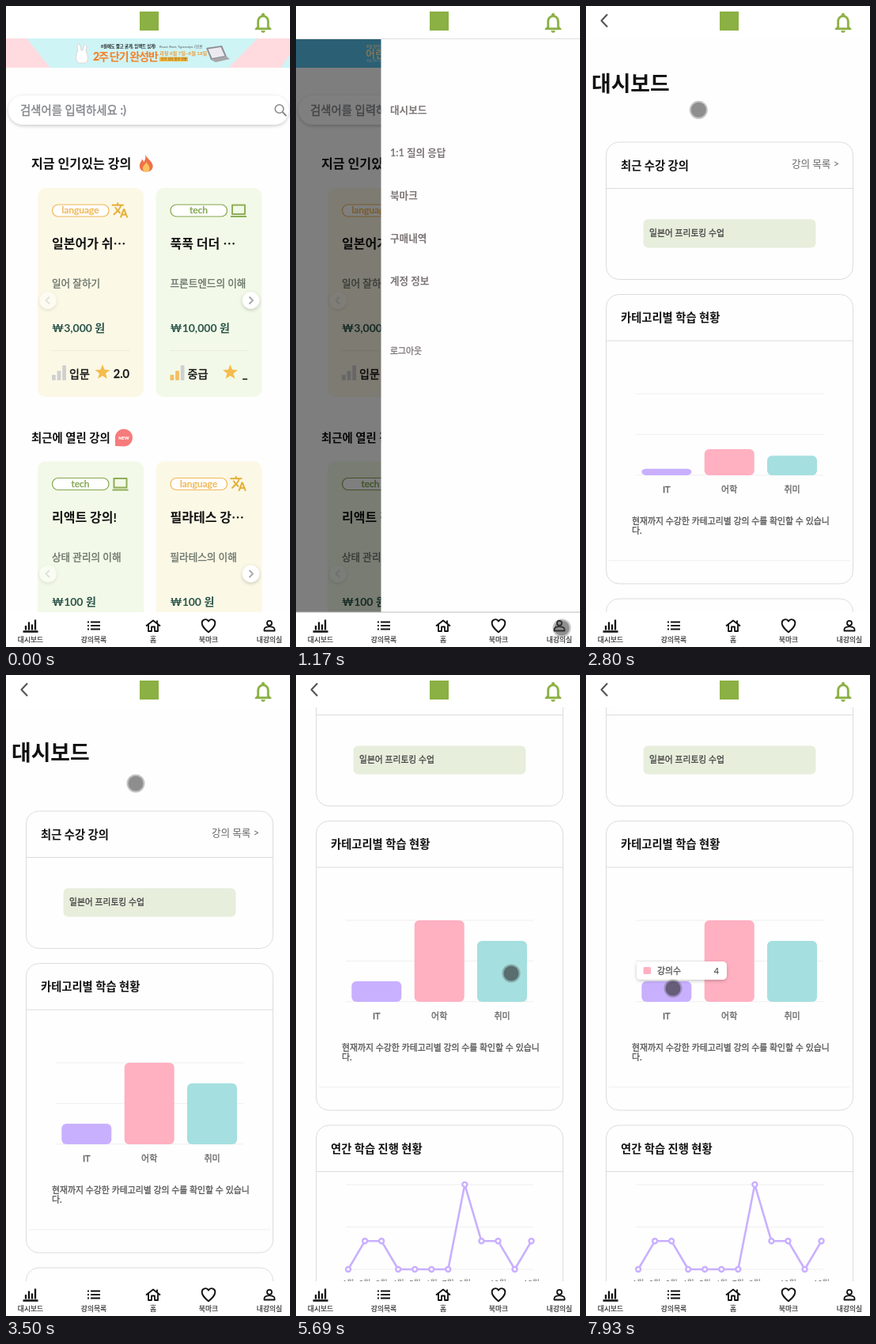
An HTML page that plays this animation: 359 by 810 pixels, repeating every 8 s.

```html
<!DOCTYPE html>
<html lang="ko">
<head>
<meta charset="utf-8">
<title>강의 대시보드</title>
<style>
  html, body { margin: 0; width: 100%; height: 100%; overflow: hidden; background: #fff; }
  svg { display: block; width: 359px; height: 810px; }
  text { font-family: Lato, "Noto Sans CJK KR", "Noto Sans CJK", sans-serif; white-space: pre; }
</style>
</head>
<body>
<svg id="stage" viewBox="0 0 359 810" xmlns="http://www.w3.org/2000/svg"></svg>
<script>
const LOOP = 8000;
const GREEN = '#8bb043', ORANGE = '#efb755', PURPLE = '#c9b0ff', PINK = '#ffb0c1', TEAL = '#a5dfdf';

// ---- drawing helpers ----
// A hairline outline stands in for the medium weight.
const text = (x, y, size, str, fill = '#111', weight = 400, anchor = 'start') =>
  `<text x="${x}" y="${y}" font-size="${size}" fill="${fill}" font-weight="${weight}" text-anchor="${anchor}"` +
  (weight === 500 ? ` stroke="${fill}" stroke-width="${size * 0.027}"` : '') + `>${str}</text>`;
const rect = (x, y, w, h, fill, r = 0, extra = '') =>
  `<rect x="${x}" y="${y}" width="${w}" height="${h}" rx="${r}" fill="${fill}" ${extra}/>`;
const line = (x1, y1, x2, y2, stroke, w = 1) =>
  `<path d="M${x1} ${y1}L${x2} ${y2}" stroke="${stroke}" stroke-width="${w}"/>`;
const stroke = (d, color, w = 2) =>
  `<path d="${d}" fill="none" stroke="${color}" stroke-width="${w}" stroke-linejoin="round"/>`;
const icon = (d, x, y, scale, fill) =>
  `<path d="${d}" transform="translate(${x} ${y}) scale(${scale})" fill="${fill}" stroke="${fill}" stroke-width=".25"/>`;
const group = (id, body, attrs = '') => `<g id="${id}" ${attrs}>${body}</g>`;

const BELL = 'M12 22c1.1 0 2-.9 2-2h-4c0 1.1.9 2 2 2zm6-6v-5c0-3.07-1.63-5.64-4.5-6.32V4c0-.83-.67-1.5-1.5-1.5s-1.5.67-1.5 1.5v.68C7.64 5.36 6 7.92 6 11v5l-2 2v1h16v-1l-2-2zm-2 1H8v-6c0-2.48 1.51-4.5 4-4.5s4 2.02 4 4.5v6z';
const TRANSLATE = 'M12.87 15.07l-2.54-2.51.03-.03c1.74-1.94 2.98-4.17 3.71-6.53H17V4h-7V2H8v2H1v1.99h11.17C11.5 7.92 10.44 9.75 9 11.35 8.07 10.32 7.3 9.19 6.69 8h-2c.73 1.63 1.73 3.17 2.98 4.56l-5.09 5.02L4 19l5-5 3.11 3.11.76-2.04zM18.5 10h-2L12 22h2l1.12-3h4.75L21 22h2l-4.5-12zm-2.62 7l1.62-4.33L19.12 17h-3.24z';
const HEART = 'M0 8.3C-5 4-8.3 1-8.3-3a4.4 4.4 0 0 1 8.3-2.4A4.4 4.4 0 0 1 8.3-3C8.3 1 5 4 0 8.3z';

// ---- home page ----
function star(cx, cy, r) {
  const pts = Array.from({ length: 10 }, (_, i) => {
    const a = -Math.PI / 2 + i * Math.PI / 5, k = i % 2 ? r * 0.42 : r;
    return `${(cx + k * Math.cos(a)).toFixed(1)},${(cy + k * Math.sin(a)).toFixed(1)}`;
  });
  return `<polygon points="${pts.join(' ')}" fill="#f4bc4b"/>`;
}

function courseCard(dx, dy, c) {
  const lang = c.tag === 'language', color = lang ? ORANGE : '#83a650';
  const levels = [7, 12, 19].map((h, i) =>
    rect(58 + i * 6.6, 473 - h, 4.8, h, i < c.level ? '#f3bf63' : '#d0d0d0', 1)).join('');
  return `<g transform="translate(${dx} ${dy})">` +
    rect(40, 230, 134, 264, lang ? '#fcf8e6' : '#f2f9e8', 10) +
    rect(58.5, 251, 71.5, 15, '#fff', 7.5, `stroke="${color}" stroke-width="1.2"`) +
    text(94, 262.3, 12, c.tag, color, 500, 'middle') +
    (lang ? icon(TRANSLATE, 133, 247, 0.92, '#e3ad35')
          : stroke('M136.5 251.5h16v11.5h-16zM134.500 266h20', '#8fae57')) +
    text(58, 306, 16, c.title, '#111', 700) +
    text(58, 355, 12.6, c.sub, '#687268', 500) +
    text(58, 412, 14, `₩${c.price} 원`, '#2d564b', 700) +
    line(58, 435.5, 156, 435.5, '#ecebdc') + levels +
    text(80, 470, 14, c.levelName, '#111', 500) + star(122 + (c.score === '_' ? 12 : 0), 463, 10) +
    text(156, 470, 14.5, c.score, '#111', 500, 'end') + '</g>';
}

const arrow = (x, y, dir, faint) =>
  `<g opacity="${faint ? 0.5 : 1}"><circle cx="${x}" cy="${y}" r="10.7" fill="#fff" filter="url(#soft)"/>` +
  stroke(`M${x - 2 * dir} ${y - 4.5}l${4.5 * dir} 4.5l${-4.5 * dir} 4.5`, faint ? '#ccc' : '#a8a8a8', 1.8) + '</g>';

const arrows = y => arrow(53, y, -1, true) + arrow(309.5, y, 1, false);

const flame =
  '<path d="M176 187c1 5 8 8 9.500 14c1 5-3 8.500-8.500 8.500s-9-4-8-9c.5-3 2.500-4 3-7c1 1 2 2 2 4c2-3 3-6 2-10.500z" fill="#ee7148"/>' +
  '<path d="M177.500 197c1 3 4 4.500 4 8s-2 4.500-4.500 4.500s-4.500-2-4-5s3-4 4.500-7.500z" fill="#fbc25c"/>';

const base = { level: 0, levelName: '입문', score: '2.0', price: '100' };
const home =
  rect(0, 41, 359, 769, '#fefefe') +
  rect(3, 113, 354.5, 37, '#fff', 18.5, 'filter="url(#soft)"') +
  text(18, 136.5, 14.4, '검색어를 입력하세요 :)', '#85878c', 500) +
  '<circle cx="345.500" cy="130" r="5.300" fill="none" stroke="#888" stroke-width="1.600"/>' +
  line(349.5, 134, 354.5, 139, '#888', 2) +
  text(32, 204.5, 16.1, '지금 인기있는 강의', '#111', 700) + flame +
  courseCard(0, 0, { ...base, tag: 'language', title: '일본어가 쉬⋯', sub: '일어 잘하기', price: '3,000' }) +
  courseCard(149.5, 0, { tag: 'tech', title: '푹푹 더더 ⋯', sub: '프론트엔드의 이해', price: '10,000', level: 2, levelName: '중급', score: '_' }) +
  arrows(372) +
  text(32, 550.5, 14.4, '최근에 열린 강의', '#111', 700) +
  '<path d="M138 556V546a11 11 0 1 1 11 10.500z" fill="#f67b7b"/>' +
  text(149, 548, 5.6, 'NEW', '#fff', 900, 'middle') +
  courseCard(0, 345.5, { ...base, tag: 'tech', title: '리액트 강의!', sub: '상태 관리의 이해' }) +
  courseCard(149.5, 345.5, { ...base, tag: 'language', title: '필라테스 강⋯', sub: '필라테스의 이해' }) +
  arrows(717.5);

// ---- banner slides ----
const bannerA =
  rect(0, 41, 359, 37, '#cef4f6') +
  '<path d="M0 41h26l30 37H0zM318 41h41v20l-12 17h-66z" fill="#ffdbe0"/>' +
  '<path d="M91 56c-3-11 3-11 4 0h2c2-11 7-9 4 1q5 9 0 15h-10q-5-7 0-16z" fill="#fff" stroke="#dbbcbc" stroke-width=".6"/>' +
  text(120, 52.5, 5.3, '8월에도 짧고 굵게, 임팩트 있게!', '#222', 700) +
  text(110, 69, 14.2, '2주 단기 완성반', '#f5822b', 900).replace('<text', '<text letter-spacing="-1.300"') +
  text(194, 52.5, 4.2, 'React, Next, Typescript 기초반', '#555') +
  text(194, 61.5, 6.2, '과정 8월 7일~8월 18일', '#ef9a35', 700) +
  rect(194, 64.5, 36, 5.5, '#f4b63f') + text(196, 69, 4, '인기 강의 할인 진행', '#6b4a16') +
  '<path d="M253 53l20-3 6 14-20 4z" fill="#8e8e96"/><path d="M255.500 54.500l16-2.500 5 11-16 3z" fill="#eceaf0"/>' +
  '<path d="M259 68l20-4 4 3-18 4z" fill="#a8a4a8"/>';
const bannerB =
  rect(0, 41, 359, 37, '#56c0ea') +
  text(89, 52.5, 5, '8월 방학 특강', '#fff0c4', 700) +
  text(88, 64.5, 13, '어린이 코딩 교실', '#ffe9b0', 900) +
  text(89, 71, 4, '처음 만나는 컴퓨터 수업', '#f4fbff');

// ---- side drawer ----
const drawer = rect(107.5, 41, 252, 726, '#fefefe') +
  ['대시보드', '1:1 질의 응답', '북마크', '구매내역', '계정 정보']
    .map((s, i) => text(119, 136 + i * 54, 12.6, s, '#7d7676', 700)).join('') +
  text(119, 440, 10.9, '로그아웃', '#7d7676', 500);

// ---- dashboard ----
const BASE = 593;
const BARS = [
  { x: 70.3, h: 26, fill: PURPLE, name: 'IT' },
  { x: 149.7, h: 103, fill: PINK, name: '어학' },
  { x: 229, h: 77, fill: TEAL, name: '취미' },
];
const panel = (y, h, title) =>
  rect(25.5, y, 312, h, '#fefefe', 16, 'stroke="#dcdcdc"') +
  line(25.5, y + 58.5, 337.5, y + 58.5, '#dcdcdc') + text(44, y + 34.5, 14.3, title, '#111', 700);
const grid = (top, gap) => [0, 1, 2].map(i => line(63, top + gap * i, 300, top + gap * i, '#efefef')).join('');

const months = [0, 1, 1, 0, 0, 0, 0, 3, 1, 1, 0, 1];
const points = months.map((v, i) => [66 + i * 21.05, 931 - v * 35.7]);
const lineChart = grid(824, 53.5) +
  stroke('M' + points.map(p => p.map(n => n.toFixed(1)).join(' ')).join('L'), PURPLE, 2.6) +
  points.map(([x, y]) => `<circle cx="${x}" cy="${y}" r="3" fill="#fff" stroke="${PURPLE}" stroke-width="2.400"/>`).join('') +
  points.map(([x], i) => i < 8 || i % 2 ? text(x, 952, 10, `${i + 1}월`, '#666', 400, 'middle') : '').join('');

const dash =
  text(7, 107.5, 26.8, '대시보드', '#111', 700) +
  panel(172, 173.5, '최근 수강 강의') +
  text(320, 204, 12.6, '강의 목록 &gt;', '#666', 400, 'end') +
  rect(72.5, 269.5, 218, 36, '#e7eedc', 6) + text(80, 291, 10.8, '일본어 프리토킹 수업', '#444', 500) +
  panel(364.5, 365.5, '카테고리별 학습 현황') + grid(490, 51.4) +
  BARS.map((b, i) => rect(b.x, BASE, 63, 0, b.fill, 6, `id="bar${i}"`) +
    text(b.x + 31.5, 615, 11, b.name, '#666', 500, 'middle')).join('') +
  text(58, 655, 10.9, '현재까지 수강한 카테고리별 강의 수를 확인할 수 있습니', '#555', 500) +
  text(58, 666.5, 10.9, '다.', '#555', 500) +
  line(29, 700.8, 334, 700.8, '#efefef') +
  panel(749, 365, '연간 학습 진행 현황') + lineChart;

const tooltip =
  rect(0, 0, 114, 23, '#fff', 5, 'filter="url(#soft)"') +
  rect(8.5, 7, 9.5, 9, PINK, 1.5, 'id="swatch"') +
  text(26, 15.5, 10.9, '강의수', '#555', 500) +
  '<text id="count" x="104" y="15.500" font-size="10.900" fill="#333" text-anchor="end"></text>';

// ---- fixed bars ----
const header = rect(0, 0, 359, 41, '#fff') +
  rect(169, 7, 24, 24, GREEN) + icon(BELL, 309.8, 5.8, 1.27, GREEN);

const navItems = [
  [31, '대시보드', stroke('M-9.500 7.500h19M-6 5.500v-5.500M-2 5.500v-10M2 5.500v-7M6 5.500v-13', '#111', 2.3)],
  [111, '강의목록', stroke('M-4-4.500H8M-4 0H8M-4 4.500H8M-8-4.500h2M-8 0h2M-8 4.500h2', '#111', 1.8)],
  [186, '홈', stroke('M-9 .5L0-6.500L9 .5M-6-1.500V7h4V1.500h4V7h4v-8.500M5-3v-3.500', '#111', 1.8)],
  [256, '북마크', stroke(HEART, '#111', 1.9)],
  [333, '내강의실', '<circle cy="-3.200" r="3" fill="none" stroke="#111" stroke-width="1.800"/>' +
    stroke('M-6.500 6.500V4.500C-6.500 2-2 1.200 0 1.200S6.500 2 6.500 4.500V6.500z', '#111', 1.8)],
];
const nav = rect(0, 766, 359, 44, '#fff') +
  navItems.map(([x, name, art]) => `<g transform="translate(${x} 783)">${art}</g>` +
    text(x, 803.5, 8.8, name, '#333', 500, 'middle')).join('');

const $ = id => document.getElementById(id);
$('stage').innerHTML = `<defs>
  <filter id="soft" x="-20%" y="-40%" width="140%" height="200%"><feDropShadow dx="0" dy="1.500" stdDeviation="2" flood-opacity=".22"/></filter>
  <clipPath id="view"><rect y="41" width="359" height="725"/></clipPath></defs>` +
  rect(0, 0, 359, 810, '#fefefe') +
  group('home', home + group('bannerA', bannerA) + group('bannerB', bannerB) +
    rect(0, 41, 359, 725, '#000', 0, 'id="shade"') + group('drawer', drawer), 'clip-path="url(#view)"') +
  group('dash', group('scroll', dash), 'clip-path="url(#view)"') +
  group('tip', tooltip) + header + nav +
  group('rules', line(0, 41.5, 359, 41.5, '#e0e0e0') + line(0, 766, 359, 766, '#bbb')) +
  group('back', stroke('M27 10.500L19.500 18.500L27 26.500', '#555', 2.1)) +
  group('cursor', '<circle id="ring" r="11.500"/><circle id="dot" r="9.500"/>');

// ---- motion ----
const clamp = v => Math.max(0, Math.min(1, v));
const span = (t, a, b) => clamp((t - a) / (b - a));
const inOut = p => p * p * (3 - 2 * p);
const out = p => 1 - (1 - p) ** 4;
const mix = (a, b, p) => a + (b - a) * p;
const within = (t, ranges) => ranges.some(([a, b]) => t >= a && t < b);
const show = (id, on) => $(id).setAttribute('visibility', on ? 'visible' : 'hidden');
const move = (id, x, y) => $(id).setAttribute('transform', `translate(${x.toFixed(2)} ${y.toFixed(2)})`);
const set = (id, name, value) => $(id).setAttribute(name, value);

const PATH = [
  [410, 359, 745], [620, 336, 786], [1500, 336, 786], [2200, 160, 130], [2400, 160, 130],
  [2540, 141, 131], [2740, 141, 131], [3160, 164, 137], [3500, 164, 137], [4190, 329, 240],
  [4790, 329, 240], [5280, 272, 377], [6150, 272, 377], [6780, 188, 352], [7050, 188, 352], [7650, 110, 396],
];
const CLICKS = [[660, 830], [2560, 2740], [5760, 5890], [6910, 7050]];
const PRESSES = [[5690, 5760], [7860, 8000]];
const SCROLL = [[0, 0], [4190, 10], [4260, 30], [4330, 91], [4390, 146], [4460, 180]];
const SWAP = 2740;

function pointer(t) {
  const i = PATH.findIndex(k => k[0] > t);
  if (i === 0) return PATH[0].slice(1);
  if (i < 0) return PATH[PATH.length - 1].slice(1);
  const [a, b] = [PATH[i - 1], PATH[i]], p = inOut(span(t, a[0], b[0]));
  return [mix(a[1], b[1], p), mix(a[2], b[2], p)];
}

function draw(t) {
  const onDash = t >= SWAP, open = 1 - (1 - span(t, 850, 1100)) ** 3;
  show('home', !onDash);
  show('dash', onDash);
  show('back', onDash);
  show('rules', !onDash && open > 0);

  const slide = inOut(span(t, 600, 900));
  move('bannerA', -359 * slide, 0);
  move('bannerB', 359 * (1 - slide), 0);
  set('shade', 'opacity', 0.5 * open);
  move('drawer', 258 * (1 - open), 0);

  const offset = SCROLL.filter(k => k[0] <= t).pop()[1];
  move('scroll', 0, -offset);
  const grow = out(span(t, SWAP, 3400));
  BARS.forEach((b, i) => {
    set('bar' + i, 'y', BASE - b.h * grow);
    set('bar' + i, 'height', b.h * grow);
  });

  const second = t >= 7000, shift = out(span(t, 7000, 7400));
  show('tip', t >= 6090);
  set('tip', 'opacity', span(t, 6060, 6260));
  move('tip', mix(143, 64, shift), mix(375, 362, shift));
  set('swatch', 'fill', second ? PINK : TEAL);
  $('count').textContent = second ? 4 : 3;

  const click = within(t, CLICKS), press = within(t, PRESSES);
  show('cursor', t >= 410);
  move('cursor', ...pointer(t));
  set('ring', 'fill', click ? 'rgba(214,208,40,.75)' : 'rgba(70,70,70,.32)');
  set('dot', 'fill', click ? 'rgba(200,192,20,.6)' : press ? 'rgba(40,40,40,.48)' : 'rgba(70,70,70,.42)');
}

function tick() {
  draw(performance.now() % LOOP);
  requestAnimationFrame(tick);
}
tick();
</script>
</body>
</html>
```
